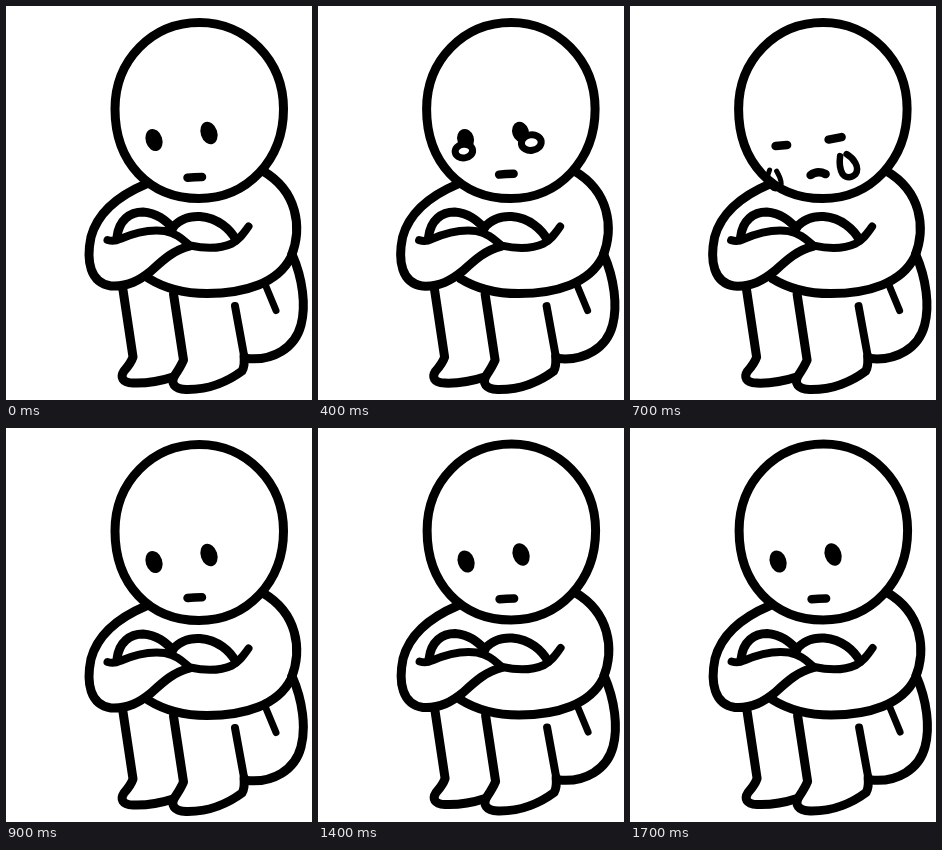
Recreate the animation shown at these times as an HTML page. Size 306x394 px, loop 1800 ms.

```html
<!DOCTYPE html>
<html lang="en">
<head>
<meta charset="utf-8">
<title>Sad figure</title>
<style>
  html, body { margin: 0; width: 100%; height: 100%; overflow: hidden; background: #fff; }
  svg { display: block; width: 100vw; height: 100vh; }
</style>
</head>
<body>
<svg viewBox="0 0 306 394" fill="none" stroke="#000" stroke-width="9" stroke-linecap="round" stroke-linejoin="round">
  <g id="figure">
    <!-- legs and seat -->
    <path d="M117 284L127 351Q125 357 118 365C114 371 116 376.500 127 377C142 377.500 155 375 167 371"/>
    <path d="M167.500 288L177.500 354Q175 360 169 369C164 377 168 383 180 383.500C204 384 224 374 236 365Q239 360 238 350"/>
    <path d="M229 300L238.500 352" stroke-width="8"/>
    <path d="M241 352.500C267 355 289 342 295 319C300 300 297 273 286 248"/>
    <path d="M259 278Q264 290 270 304.500" stroke-width="7"/>
    <!-- arms -->
    <path d="M140 178C114 189 92 205 85 231C80 255 84 277 105 280C122 281 134 274 145 265C158 253 168 244 184 240"/>
    <path d="M142 272C158 282 178 287.500 201 287.500C239 287.500 272 277 285 251C297 221 291 185 257 165"/>
    <path d="M101.500 234Q108 236 114 233C130 226 144 223 159 225C172 228 177 234 184 239.500C200 243 214 243 226 237.500C234 233 237 228 242.500 220.500" stroke-width="8"/>
    <path d="M111 231C113 214 124 206 137 206C151 207 159 214 167 222"/>
    <path d="M166 222C175 212 184 210 194 210.500C212 212 224 223 230 234"/>
    <path d="M193.500 16.500C240 16.500 277.500 54 277.500 103C277.500 154 241 192.500 193 192.500C143 192.500 109 156 109 103C109 54 146 16.500 193.500 16.500Z" fill="#fff"/>
    <g id="face"></g>
  </g>
</svg>
<script>
const figure = document.getElementById('figure');
const face = document.getElementById('face');
const STEP = 100, STEPS = 18;
const wobble = ['', 'translate(-.4 .1)', 'translate(.1 -.5)'];

const line = (d, width = 8.5) => `<path d="${d}" stroke-width="${width}"/>`;
const oval = (x, y, rx, ry, angle, style) =>
  `<ellipse cx="${x}" cy="${y}" rx="${rx}" ry="${ry}" transform="rotate(${angle} ${x} ${y})" ${style}/>`;
const eye = (x, y, ry) => oval(x, y, 8.3, ry, -18, 'fill="#000" stroke="none"');
const ring = (x, y, size) =>
  oval(x, y, 9.2 * size, 7.2 * size, -8, 'fill="#fff" stroke-width="7"');

const openEyes = squeeze => eye(148, 134 - squeeze, 11.3 - squeeze) + eye(203, 127 - squeeze, 11.5 - squeeze);
const closedEyes = line('M146 140L157.500 139') + line('M199 133.500L212 131');
const flatMouth = y => line(`M181.500 ${y}Q188 ${y - .8} 196 ${y - .8}`);
const frown = line('M181 169Q188 164 196 168');

function drops(fall) {
  return `<g transform="translate(0 ${fall})">` +
    line('M210.500 142Q209 153 213 160Q219 166.500 226 160C230.500 153 224 144 217 140', 6.5) +
    `</g><g transform="translate(${fall * .25} ${fall})">` +
    line('M138 156Q134 165 138 172', 5) +
    line('M145 157C149 164 152 172 147 174Q143 176 140 173', 5) + '</g>';
}

function expression(step) {
  if (step === 3) return openEyes(.5) + ring(147, 143, .7) + ring(211, 134, .7) + flatMouth(170);
  if (step === 4) return openEyes(1) + ring(146.3, 145, .95) + ring(213.700, 136.500, 1.08) + flatMouth(168.5);
  if (step === 5) return closedEyes + drops(-5) + frown;
  if (step === 6) return closedEyes + drops(0) + frown;
  if (step === 7) return closedEyes + drops(8) + frown;
  if (step === 8) return closedEyes + frown;
  return openEyes(0) + flatMouth(step === 9 ? 170 : 171.7);
}

let shown = -1;
function tick(now) {
  const step = Math.floor(now / STEP) % STEPS;
  if (step !== shown) {
    shown = step;
    figure.setAttribute('transform', wobble[step % 3]);
    face.innerHTML = expression(step);
  }
  requestAnimationFrame(tick);
}
tick(0);
</script>
</body>
</html>
```
